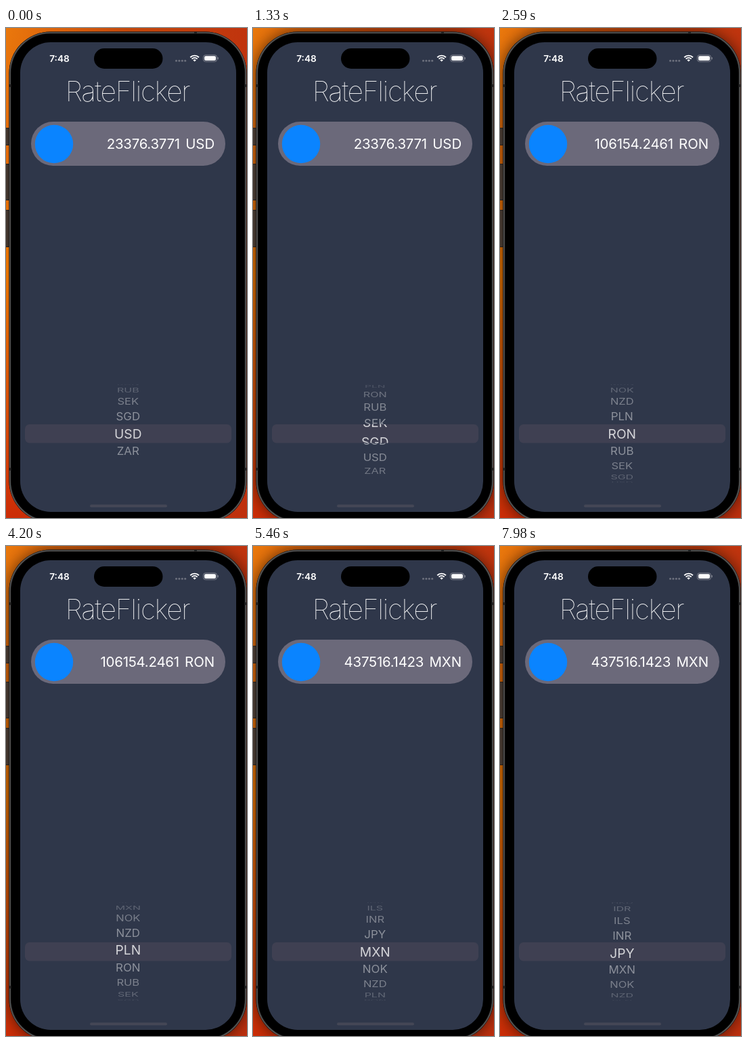
Recreate the animation shown at these times as an HTML page with a canvas. Size 356x722 px, loop 8000 ms.

```html
<!DOCTYPE html>
<html lang="en">
<head>
<meta charset="utf-8">
<title>Rate picker</title>
<style>
  html, body { margin: 0; width: 100%; height: 100%; overflow: hidden; background: #000; }
  canvas { display: block; width: 356px; height: 722px; }
</style>
</head>
<body>
<canvas id="stage"></canvas>
<script>
const W = 356, H = 722, LOOP = 8000, STEP = 70;
const canvas = document.getElementById('stage');
const ctx = canvas.getContext('2d');
const ratio = Math.max(1, window.devicePixelRatio || 1);
canvas.width = W * ratio;
canvas.height = H * ratio;

const CODES = ['AUD', 'BRL', 'CAD', 'CNY', 'EUR', 'GBP', 'HKD', 'IDR', 'ILS', 'INR', 'JPY',
  'MXN', 'NOK', 'NZD', 'PLN', 'RON', 'RUB', 'SEK', 'SGD', 'USD', 'ZAR'];

// Wheel position over time: [ms, row index]
const SCROLL = [
  [0, 19], [840, 19], [910, 18.92], [1050, 18.6], [1330, 17.59], [1680, 16.05],
  [1960, 14.81], [2100, 14.93], [2240, 15], [4130, 15], [4200, 14.09], [4550, 12.3],
  [4760, 11.4], [4900, 11.08], [4970, 11.08], [5040, 11.03], [5110, 11],
  [7350, 11], [7420, 10.81], [7630, 10.3], [7840, 9.88], [7910, 9.88], [7980, 9.93]
];
const UNITS = [[0, 'USD'], [2240, 'RON'], [5110, 'MXN']];
const AMOUNTS = [[0, '23376.3771'], [2590, '106154.2461'], [5460, '437516.1423']];

const WHEEL = { x: 180.3, y: 597.8, radius: 73.5, step: Math.PI / 9, zoom: 1.13 };
const BAND = { x: 28, y: 584, w: 305, h: 27.5 };

function valueAt(list, t) {
  return list.filter(([start]) => start <= t).pop()[1];
}

function scrollAt(t) {
  const next = SCROLL.findIndex(([ms]) => ms > t);
  if (next < 0) return SCROLL[SCROLL.length - 1][1];
  const [t0, a] = SCROLL[next - 1], [t1, b] = SCROLL[next];
  return a + (b - a) * (t - t0) / (t1 - t0);
}

function box(x, y, w, h, r, fill) {
  ctx.beginPath();
  ctx.roundRect(x, y, w, h, r);
  ctx.fillStyle = fill;
  ctx.fill();
}

function outline(x, y, w, h, r, color, width) {
  ctx.beginPath();
  ctx.roundRect(x, y, w, h, r);
  ctx.strokeStyle = color;
  ctx.lineWidth = width;
  ctx.stroke();
}

function disc(x, y, r, fill) {
  ctx.beginPath();
  ctx.arc(x, y, r, 0, Math.PI * 2);
  ctx.fillStyle = fill;
  ctx.fill();
}

function text(str, x, y, size, weight, align, fill, spacing = 0) {
  ctx.font = `${weight} ${size}px Inter, sans-serif`;
  ctx.letterSpacing = spacing + 'px';
  ctx.textAlign = align;
  ctx.fillStyle = fill;
  ctx.fillText(str, x, y);
}

function gradient(x1, y1, colors) {
  const g = ctx.createLinearGradient(0, 0, x1, y1);
  colors.forEach((c, i) => g.addColorStop(i / (colors.length - 1), c));
  return g;
}

function drawWallpaper() {
  ctx.fillStyle = gradient(0, H, ['#ea780c', '#e26a08', '#e87400', '#d85006', '#cc2c06']);
  ctx.fillRect(0, 0, W, H);
  ctx.fillStyle = gradient(W, 0, ['rgba(190,52,12,0)', 'rgba(180,52,10,.7)', 'rgba(190,48,14,.95)']);
  ctx.fillRect(0, 0, W, H);
}

function drawBody(shaded) {
  // The window shadow appears once the phone has focus
  ctx.save();
  if (shaded) {
    ctx.shadowColor = 'rgba(0,0,0,.6)';
    ctx.shadowBlur = 22 * ratio;
  }
  box(4.5, 5.5, 351, 723, 61, '#1d1c1c');
  ctx.restore();

  for (const [y, h] of [[147, 26], [200, 54], [268, 55]]) {
    box(-3, y, 9, h, 1.5, '#241e1b');
    box(-3, y + 1, 7, h - 2, 1, '#40342c');
  }
  box(4.5, 5.5, 351, 723, 61, '#1d1c1c');
  outline(6, 7, 348, 720, 59.5, '#595857', 1.6);
  box(7.5, 8.5, 345, 717, 58, '#000');
  ctx.fillStyle = '#222';
  for (const y of [83, 648]) {
    ctx.fillRect(4.5, y, 3, 4);
    ctx.fillRect(352.5, y, 3, 4);
  }
  ctx.fillRect(278, 5.5, 4, 3);
  box(21, 21, 319, 692, 45, '#2f374a');
  box(130, 30, 101.5, 30, 15, '#000');
}

function drawStatus() {
  text('7:48', 79, 49.6, 13.7, 600, 'center', '#fff');
  for (let i = 0; i < 4; i++) disc(251.5 + i * 4.4, 48.2, 1.5, '#6d717e');

  // Wi-Fi: a dot wedge and two arcs
  const wx = 278.6, wy = 49.6;
  ctx.strokeStyle = '#fff';
  ctx.lineWidth = 1.9;
  for (const r of [5.7, 9]) {
    ctx.beginPath();
    ctx.arc(wx, wy, r, -Math.PI * 0.75, -Math.PI * 0.25);
    ctx.stroke();
  }
  ctx.beginPath();
  ctx.moveTo(wx, wy);
  ctx.arc(wx, wy, 3.2, -Math.PI * 0.75, -Math.PI * 0.25);
  ctx.fillStyle = '#fff';
  ctx.fill();

  outline(291.5, 39.8, 20, 9.8, 3.2, '#888b96', 0.9);
  box(293, 41.3, 17, 6.8, 2, '#fff');
  box(312.6, 43, 1.2, 3.4, 0.6, '#888b96');
}

function drawCard(t) {
  box(37, 138, 287, 65, 32.5, '#6b697a');
  disc(71, 171, 28.2, '#0a84ff');
  const unit = valueAt(UNITS, t);
  text(unit, 308.2, 177.7, 20.45, 400, 'right', '#fff');
  const edge = 308.2 - ctx.measureText(unit).width - 8.2;
  text(valueAt(AMOUNTS, t), edge, 177.7, 20.45, 400, 'right', '#fff', -0.25);
}

function drawRows(pos, zoom, alphaOf) {
  CODES.forEach((code, i) => {
    const angle = (i - pos) * WHEEL.step;
    if (Math.abs(angle) > 1.5) return;
    const c = Math.cos(angle);
    ctx.save();
    ctx.translate(WHEEL.x, WHEEL.y + WHEEL.radius * Math.sin(angle) * zoom);
    ctx.scale(zoom * (1 - 0.12 * (1 - c)), zoom * c);
    ctx.globalAlpha = alphaOf(c);
    text(code, 0, 6.2, 17, 400, 'center', '#fff');
    ctx.restore();
  });
}

function drawWheel(pos) {
  box(BAND.x, BAND.y, BAND.w, BAND.h, 6.5, '#3f4052');

  ctx.save();
  ctx.beginPath();
  ctx.rect(21, 525, 319, 145);
  ctx.rect(BAND.x, BAND.y, BAND.w, BAND.h);
  ctx.clip('evenodd');
  drawRows(pos, 1, c => 0.48 * c);
  ctx.restore();

  ctx.save();
  ctx.beginPath();
  ctx.rect(BAND.x, BAND.y, BAND.w, BAND.h);
  ctx.clip();
  drawRows(pos, WHEEL.zoom, () => 0.78);
  ctx.restore();
}

function draw(now) {
  const t = Math.floor((now % LOOP) / STEP) * STEP;
  ctx.setTransform(ratio, 0, 0, ratio, 0, 0);
  drawWallpaper();
  drawBody(t >= 630);
  drawStatus();
  text('RateFlicker', 179.5, 108.3, 41, 100, 'center', '#fff', -1.4);
  drawCard(t);
  drawWheel(scrollAt(t));
  box(124, 702.3, 114, 4, 2, '#444756');
}

let start;
function tick(now) {
  start ??= now;
  draw(now - start);
  requestAnimationFrame(tick);
}
requestAnimationFrame(tick);
</script>
</body>
</html>
```
